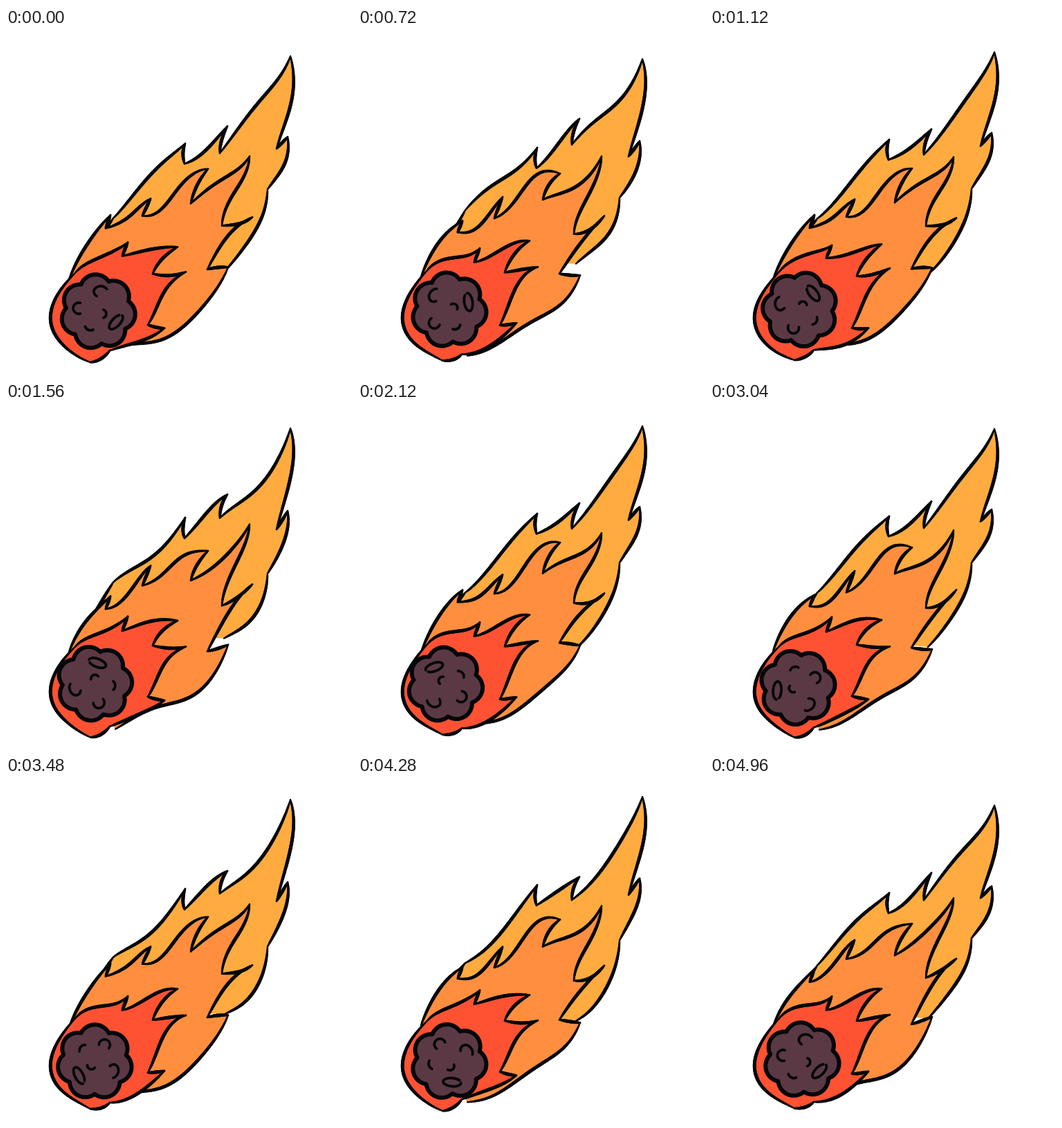
Write an HTML page with a canvas that moves like this. It is 500 by 500 pixels and loops after 5 s.

```html
<!DOCTYPE html>
<html lang="en">
<head>
<meta charset="utf-8">
<title>Meteor</title>
<style>
  html, body { margin: 0; width: 100%; height: 100%; overflow: hidden; background: #fff; }
  canvas { display: block; width: 500px; height: 500px; }
</style>
</head>
<body>
<canvas id="stage" width="500" height="500"></canvas>
<script>
const ctx = document.getElementById('stage').getContext('2d');
const LOOP = 5000, STEP = 40, TAU = Math.PI * 2, WAVE = 148;

// Corners are [x, y, bow in, bow out]: the bows bend the edge that leads to the corner,
// as shares of its length, outwards when positive.
const flames = [
  {
    fill: '#ffab3f', period: 1000, sway: 8, lag: 0.97,
    corners: [
      [110, 335], [155, 268], [259, 165.5, -0.02, -0.04],
      [258, 195, -0.12, -0.12], [320, 139, -0.05, 0.02],
      [309, 175, -0.1, -0.1], [411, 38, -0.04, -0.11],
      [391, 178, 0.15, 0.04], [407, 156],
      [378, 240, 0.18, 0.08], [315, 348, 0.18, 0.14]
    ]
  },
  {
    fill: '#ff8f3f', period: 1160, sway: 6.5, lag: 0.57,
    corners: [
      [91, 362], [151, 276, 0.09, 0.09],
      [144, 294], [209, 243, -0.22, 0],
      [197, 271], [292, 209, -0.15, 0.28],
      [267, 253, -0.1, -0.1], [352, 183, -0.04, -0.14],
      [312, 292, 0.1, -0.1], [356, 270, -0.12, -0.12],
      [291, 354, -0.1, -0.05], [321, 351],
      [158, 469, 0.22, 0.1]
    ]
  },
  {
    fill: '#ff5233', period: 1400, sway: 4.5, lag: 0.64,
    corners: [
      [150, 469], [122, 482, 0.15, 0.15], [100, 352, 0.5, 0.45],
      [176, 314, 0.15, -0.1], [168, 334],
      [248, 312, -0.02, 0.12], [212, 354, -0.12, -0.12],
      [260, 349, -0.05, -0.05], [205, 429, -0.22, -0.02],
      [229, 430, -0.05, -0.05], [150, 469, 0.1, 0.1]
    ]
  }
];

function edge([x0, y0], [x1, y1, bowIn = 0, bowOut = 0]) {
  const dx = x1 - x0, dy = y1 - y0, n = Math.ceil(Math.hypot(dx, dy) / 3) + 4;
  return Array.from({ length: n + 1 }, (_, i) => {
    const u = i / n, bow = 3 * u * (1 - u) * ((1 - u) * bowIn + u * bowOut);
    return [x0 + dx * u + dy * bow, y0 + dy * u - dx * bow];
  });
}

function brush(line, thin, thick) {
  const last = line.length - 1;
  for (let i = 0; i < last; i++) {
    ctx.lineWidth = thin + (thick - thin) * Math.sqrt(Math.sin(Math.PI * (i + 0.5) / last));
    ctx.beginPath();
    ctx.moveTo(...line[i]);
    ctx.lineTo(...line[i + 1]);
    ctx.stroke();
  }
}

// A wave travels along x through each flame and dies out towards the head.
function flame({ fill, period, sway, lag, corners }, t) {
  const ripple = ([x, y]) => {
    const grip = Math.min(1, Math.max(0, (x - 60) / 100));
    return [x, y + sway * grip * Math.cos(TAU * (t / period - x / WAVE + lag))];
  };
  const lines = corners.slice(1).map((c, i) => edge(corners[i], c).map(ripple));
  ctx.beginPath();
  lines.flat().forEach(p => ctx.lineTo(...p));
  ctx.closePath();
  ctx.fillStyle = fill;
  ctx.fill();
  lines.forEach(line => brush(line, 1.8, 5));
}

function arc(x, y, rx, ry, tilt, from, to) {
  ctx.beginPath();
  ctx.ellipse(x, y, rx, ry, tilt * TAU, from * TAU, to * TAU);
  ctx.stroke();
}

function rock(t) {
  ctx.save();
  ctx.translate(129.5, 410);
  ctx.rotate(-TAU * t / LOOP);
  ctx.translate(3.5, 0);
  ctx.beginPath();
  for (let a = 0; a < TAU; a += TAU / 210) {
    const r = 46 + 8 * Math.abs(Math.sin(3.5 * (a + 2.13))) ** 0.8;
    ctx.lineTo(r * Math.cos(a), r * Math.sin(a));
  }
  ctx.closePath();
  ctx.fillStyle = '#5b3944';
  ctx.fill();
  ctx.lineWidth = 6;
  ctx.stroke();
  ctx.lineWidth = 3.8;
  arc(-28, -5, 8, 8, 0, 0.2, 0.8);
  arc(4, -29, 10, 8, 0, 0.35, 0.92);
  arc(6, 3, 6, 6, 0, -0.2, 0.2);
  arc(-11, 19, 8, 8, 0, 0.17, 0.45);
  arc(26, 15, 13, 6, -0.13, 0, 0.9);
  ctx.restore();
}

function draw(now) {
  const t = Math.floor((now % LOOP) / STEP) * STEP;
  ctx.fillStyle = '#fff';
  ctx.fillRect(0, 0, 500, 500);
  ctx.strokeStyle = '#04070a';
  ctx.lineCap = ctx.lineJoin = 'round';
  flames.forEach(f => flame(f, t));
  rock(t);
}

const start = performance.now();
function tick() {
  draw(performance.now() - start);
  requestAnimationFrame(tick);
}
tick();
</script>
</body>
</html>
```
